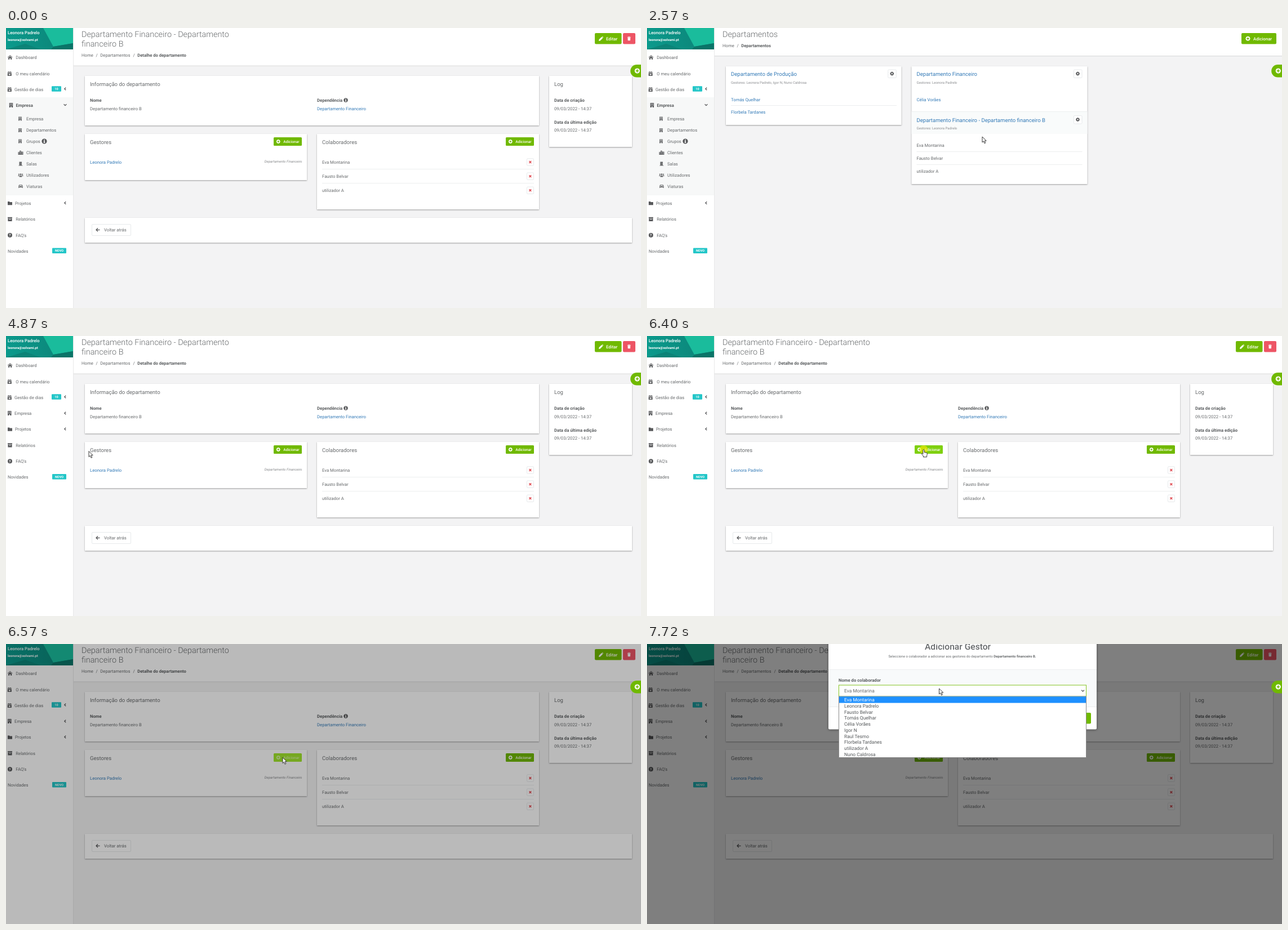
An HTML page that plays this animation: 1127x497 px, repeating every 8000 ms.

```html
<!DOCTYPE html>
<html lang="pt">
<head>
<meta charset="utf-8">
<title>Departamentos</title>
<style>
html, body { margin: 0; width: 100%; height: 100%; overflow: hidden; background: #f3f3f4 }
svg { display: block; width: 100vw; height: 100vh }
text { font-family: Roboto, sans-serif; text-rendering: geometricPrecision; white-space: pre }
.loading text { font-family: "Liberation Sans", Arial, sans-serif }
.loading .ico { display: none }
.card { fill: #fff; filter: drop-shadow(0 1px 1px rgba(0,0,0,.36)) }
</style>
</head>
<body>
<svg id="stage" viewBox="0 0 1127 497"></svg>
<script>
const GREY = '#676a6c', LINK = '#337ab7', GREEN = '#70b900', RED = '#ed5565', TEAL = '#23c6c8', LINE = '#e7eaec';
const BODY = 7.73, HEAD = 9.55, SMALL = 6.12;
const user = 'Leonora Padrelo';
const team = ['Eva Montarina', 'Fausto Belvar', 'utilizador A'];
const options = [team[0], user, team[1], 'Tomás Quelhar', 'Célia Vorães', 'Igor N', 'Raul Tesmo',
  'Florbela Tardanes', team[2], 'Nuno Caldrosa'];

// Drawing helpers; text is placed by the middle of its capitals.
const text = (x, y, s, size = BODY, fill = GREY, weight = 400, more = '') =>
  `<text x="${x}" y="${y + size * .355}" font-size="${size}" fill="${fill}" font-weight="${weight}" ${more}>${s}</text>`;
const bold = (x, y, s, size = BODY, fill = '#5b5e60') => text(x, y, s, size, fill, 700);
const rect = (x, y, x2, y2, fill, more = '') =>
  `<rect x="${x}" y="${y}" width="${x2 - x}" height="${y2 - y}" fill="${fill}" ${more}/>`;
const card = (x, y, x2, y2) => rect(x, y, x2, y2, '#fff', 'class="card"');
const box = (x, y, x2, y2, stroke = LINE) => rect(x, y, x2, y2, '#fff', `rx="1.5" stroke="${stroke}"`);
const rule = (x, y, x2) => rect(x, y, x2, y + 1, '#eceeef');
const group = (id, body, more = '') => `<g id="${id}" ${more}>${body}</g>`;

const icons = {
  home: 'M-4.5 0L0-4L4.5 0L4 .6L0-3L-4 .6ZM-3 .5L0-2.1L3 .5V4H1V1.5H-1V4H-3Z',
  calendar: 'M-3.5-3H-2V-4H-1V-3H1V-4H2V-3H3.5V-1.7H-3.5ZM-3.5-1.1H3.5V4H-3.5ZM-1.5 .5V2.4H1.5V.5Z',
  building: 'M-3.2-4H3.2V4H.8V2H-.8V4H-3.2ZM-2-3h1.3v1.2h-1.3ZM.7-3h1.3v1.2h-1.3ZM-2-.8h1.3v1.2h-1.3ZM.7-.8h1.3v1.2h-1.3Z',
  city: 'M-5-1.5H-2.2V-4H1V-2H5V4H-5ZM-4 0v1h1v-1ZM-1-2.5v1h1v-1ZM-1 .3v1h1v-1ZM2.5-.5v1h1v-1ZM2.5 1.5v1h1v-1Z',
  door: 'M-2.8-4H2.3V3H4V4H-4V3H-2.8ZM.6-.5v1h.8v-1Z',
  users: 'M0-3.5a1.7 1.7 0 1 0 .01 0ZM-3.5-3a1.2 1.2 0 1 0 .01 0ZM3.5-3a1.2 1.2 0 1 0 .01 0ZM-2.6 3.5V2Q-2.4 .6 0 .6T2.6 2V3.5ZM-5 1.8V.6Q-4.4-.4-2.2 .1L-3.2 1.8ZM5 1.8V.6Q4.4-.4 2.2 .1L3.2 1.8Z',
  car: 'M-4.2-.4L-3-3H3L4.2-.4V3.3H2.8V2.2H-2.8V3.3H-4.2ZM-2.8-.6H2.8L2.1-2H-2.1ZM-3.2 .3v.9h1.3v-.9ZM1.9 .3v.9h1.3v-.9Z',
  folder: 'M-4-3H-1L0-2H4V3.2H-4Z',
  archive: 'M-4-3.6H4V-1.6H-4ZM-3.6-1.1H3.6V3.6H-3.6ZM-1.3-.3V.6H1.3V-.3Z',
  trash: 'M-3.2-3.2H-1L-.5-4H.5L1-3.2H3.2V-2.2H-3.2ZM-2.7-1.7H2.7L2.3 4H-2.3Z',
  pencil: 'M-4 4L-3.4 1.3L1.2-3.3L3.3-1.2L-1.3 3.4ZM1.8-3.8L2.6-4.3L4.3-2.6L3.8-1.8Z',
  gear: 'M-.7-3.6H.7L1-2.5L2.2-3L3-2.2L2.5-1L3.6-.7V.7L2.5 1L3 2.2L2.2 3L1 2.5L.7 3.6H-.7L-1 2.5L-2.2 3L-3 2.2L-2.5 1L-3.6 .7V-.7L-2.5-1L-3-2.2L-2.2-3L-1-2.5ZM0-1.3a1.3 1.3 0 1 0 .01 0Z',
  plus: 'M0-4a4 4 0 1 0 .01 0ZM-.7-2.3H.7V-.7H2.3V.7H.7V2.3H-.7V.7H-2.3V-.7H-.7Z',
  info: 'M0-4a4 4 0 1 0 .01 0ZM-.7-2.6H.7V-1.4H-.7ZM-1-.8H.7V1.6H1.2V2.5H-1.2V1.6H-.7V0H-1Z'
};
const icon = (name, x, y, fill = '#58595b', scale = 1) =>
  `<path class="ico" d="${icons[name]}" fill="${fill}" fill-rule="evenodd" transform="translate(${x} ${y}) scale(${scale})"/>`;
const stroke = (x, y, d, color = '#58595b', width = 1.3) =>
  `<path class="ico" d="${d}" transform="translate(${x} ${y})" fill="none" stroke="${color}" stroke-width="${width}"/>`;
const chevLeft = y => stroke(105, y, 'M1.2-2.3L-1.2 0L1.2 2.3');
const chevDown = (x, y) => stroke(x, y, 'M-2.4-1.2L0 1.2L2.4-1.2');
const badge = (x, y, x2, s) => rect(x, y - 5, x2, y + 4.5, TEAL, 'rx="1"') +
  text((x + x2) / 2, y - .2, s, 5.6, '#fff', 700, 'text-anchor="middle"');
const addSmall = (x, id) => rect(x, 194, x + 50, 209, GREEN, `rx="1.5" id="${id}"`) +
  group(id + 'Label', icon('plus', x + 8.3, 201.5, '#fff', .85) + text(x + 17.3, 201.7, 'Adicionar', 6.6, '#fff', 500));

const profile = rect(0, 0, 119, 38, 'url(#teal)') +
  '<path d="M66 0H119V27L84 33Z" fill="#1abc9c"/><path d="M84 33L119 27V38H80Z" fill="#0a7468"/><path d="M0 38L34 28L62 38Z" fill="#0b8377"/>' +
  text(3, 8, user, BODY, '#fff', 500) + bold(3, 20.5, 'leonora@xolvami.pt', 6, '#fff');

const lowerMenu = y => icon('folder', 7, y) + text(16, y, 'Projetos') + chevLeft(y - .5) +
  icon('archive', 7, y + 28.3) + text(17.3, y + 28.3, 'Relatórios') +
  '<circle class="ico" cx="7" cy="' + (y + 56.8) + '" r="4" fill="#58595b"/>' + bold(5.2, y + 56.8, '?', 6.4, '#fff') +
  text(17.3, y + 56.8, 'FAQ\'s') + text(3, y + 85, 'Novidades') + badge(82, y + 84.5, 107, 'NOVO');

const subItems = [['building', 'Empresa', 161], ['building', 'Departamentos', 181.5], ['building', 'Grupos', 201],
  ['city', 'Clientes', 221.3], ['door', 'Salas', 241], ['users', 'Utilizadores', 261.3], ['car', 'Viaturas', 281]];

const sidebar = rect(0, 0, 119, 497, '#fff') + rect(119, 0, 120, 497, '#e8e8e9') + profile +
  icon('home', 7.2, 52) + text(17.3, 52, 'Dashboard') +
  icon('calendar', 6.3, 81) + text(17.3, 81, 'O meu calendário') +
  icon('calendar', 6.3, 109) + text(15, 109, 'Gestão de dias') + badge(81, 108.3, 98, '10') + chevLeft(108) +
  group('menuOpen', rect(0, 123, 119, 297, '#f7f8f8') + rect(0, 171, 119, 191, '#eef0f1', 'id="rowHover"') +
    icon('building', 9, 137) + bold(17.5, 137.5, 'Empresa') + chevDown(105, 136.5) +
    subItems.map(([i, s, y]) => icon(i, i == 'building' ? 25 : 26, y, '#6a6b6d', .9) + text(36, y, s)).join('') +
    icon('info', 68, 201, '#58595b', 1.15) + lowerMenu(311)) +
  group('menuClosed', icon('building', 6.3, 137) + text(15, 137.5, 'Empresa') + chevLeft(137) + lowerMenu(165.5));

const header = h => rect(120, 0, 1127, h, '#fff') + rect(120, h, 1127, h + 1, '#dfe0e1') + rect(120, h + 1, 1127, h + 2, '#ebebec');
const title = (y, s) => text(134, y, s, 14.4, GREY, 300);

const detailHead = header(66.5) + title(11, 'Departamento Financeiro - Departamento') + title(28, 'financeiro B') +
  text(134, 48.5, 'Home') + text(159.5, 48.5, '/') + text(167.3, 48.5, 'Departamentos') + text(225.5, 48.5, '/') +
  bold(233.3, 48.5, 'Detalhe do departamento', 7.6) +
  rect(1045, 9, 1092.5, 28.5, GREEN, 'rx="2"') + icon('pencil', 1056, 19, '#fff') + text(1065, 19, 'Editar', BODY, '#fff', 500) +
  rect(1095, 9, 1117, 28.5, RED, 'rx="2"') + icon('trash', 1105.8, 18.7, '#fff', .9);

const detail = card(140, 85, 946, 173) + text(149, 99.3, 'Informação do departamento', HEAD) +
  bold(149, 128.5, 'Nome') + text(149, 143, 'Departamento financeiro B') +
  bold(552, 128.5, 'Dependência') + icon('info', 603, 128, '#58595b', .95) + text(552, 143, 'Departamento Financeiro', BODY, LINK) +
  card(964, 85, 1111, 211) + text(973, 99.3, 'Log', HEAD) +
  bold(973, 128.5, 'Data de criação') + text(973, 143, '09/03/2022 - 14:37') +
  bold(973, 167, 'Data da última edição') + text(973, 181.3, '09/03/2022 - 14:37') +
  card(140, 188, 534, 270) + text(149, 202.3, 'Gestores', HEAD) + addSmall(475, 'addManager') +
  text(149, 238, user, BODY, LINK) + text(525.5, 237, 'Departamento Financeiro', SMALL, '#85878a', 400, 'font-style="italic" text-anchor="end"') +
  card(552, 188, 946, 322) + text(561, 202.3, 'Colaboradores', HEAD) + addSmall(887, 'addMember') +
  team.map((s, i) => {
    const y = 238 + i * 25.1;
    return text(561, y, s) + box(924.5, y - 6.2, 936.5, y + 6.2) + stroke(930.4, y, 'M-1.9-1.9L1.9 1.9M1.9-1.9L-1.9 1.9', '#df4a52', 1.4);
  }).join('') + rule(561, 250, 937) + rule(561, 275, 937) +
  card(140, 337, 1111, 381) + box(152.5, 348.5, 221.5, 368.5) +
  stroke(163, 358.3, 'M3.5 0H-3M0-3L-3 0L0 3') + text(174, 358.5, 'Voltar atrás');

const listHead = header(49) + title(11, 'Departamentos') + text(134, 31.3, 'Home') + text(159.5, 31.3, '/') + bold(167.3, 31.3, 'Departamentos', 7.6) +
  rect(1055, 9, 1117, 28.5, GREEN, 'rx="2"') + icon('plus', 1066.5, 18.7, '#fff') + text(1076, 19, 'Adicionar', BODY, '#fff', 500);

const gear = (x, y) => box(x - 7, y - 7, x + 7.5, y + 7.5) + icon('gear', x, y, '#58595b', .95);
const dept = (x, y, name, managers, id) => text(x, y, name, HEAD, LINK, 400, `id="${id}"`) +
  text(x, y + 14.7, 'Gestores: ' + managers, SMALL, '#8b8d90');
const list = card(140, 68, 451.5, 172) +
  dept(149, 82, 'Departamento de Produção', user + ', Igor N, Nuno Caldrosa', 'deptA') + gear(434.8, 81) +
  text(149, 127, 'Tomás Quelhar', BODY, LINK) + rule(149, 137, 443) + text(149, 149.5, 'Florbela Tardanes', BODY, LINK) +
  card(469.5, 68, 781.5, 277) + dept(478.5, 82, 'Departamento Financeiro', user, 'deptB') + gear(764.5, 81) +
  text(478.5, 127, 'Célia Vorães', BODY, LINK) +
  rect(469.5, 148, 781.5, 188, '#f9fbfb') + rule(469.5, 148, 781.5) +
  dept(478.5, 163.5, 'Departamento Financeiro - Departamento financeiro B', user, 'deptC') + gear(764.5, 162.5) +
  team.map((s, i) => text(478.5, 208.5 + i * 23, s)).join('') + rule(478.5, 219, 772.5) + rule(478.5, 242, 772.5);

const fab = '<path d="M1127 65H1119.5a11.3 11.3 0 0 0 0 22.6H1127Z" fill="#70b900"/>' + icon('plus', 1120.3, 76, '#fff', 1.15);

const modal = rect(322, -80, 798, 151.5, '#fff', 'rx="2" style="filter:drop-shadow(0 1px 2px rgba(0,0,0,.4))"') +
  rect(322, 45, 798, 111.5, '#f8fafb') + rule(322, 45, 798) + rule(322, 111, 798) +
  text(551.5, 4.5, 'Adicionar Gestor', 15.6, GREY, 500, 'text-anchor="middle"') +
  text(559.5, 22.2, 'Seleccione o colaborador a adicionar aos gestores do departamento <tspan font-weight="700">Departamento financeiro B.</tspan>',
    SMALL, GREY, 400, 'text-anchor="middle"') +
  bold(340, 64.3, 'Nome do colaborador') +
  rect(340.5, 73, 779.5, 93, '#fff', 'id="select" stroke="#dfe2e4"') +
  text(350, 83.5, team[0], 8.45) + chevDown(773.5, 83) +
  box(691, 122, 729, 141) + text(710, 131.7, 'Fechar', BODY, GREY, 400, 'text-anchor="middle"') +
  rect(734, 122, 788, 141.5, GREEN, 'rx="2"') + stroke(746.3, 131.3, 'M-3.6 .2L-1.1 2.6L3.6-2.4', '#fff', 1.8) +
  text(757.3, 131.7, 'Gravar', BODY, '#fff', 500);

const dropdown = rect(340.5, 93, 779.5, 201.5, '#fff', 'stroke="#8b8b8b"') + rect(341, 93.3, 779, 104.6, '#1e90ff') +
  options.map((s, i) => text(350, 99.2 + i * 10.72, s, 8.45, i ? '#55585a' : '#fff')).join('');

const cursor = group('arrow', '<path d="M0 0V10L2.3 7.9L4 11.8L5.8 11L4.1 7.2H7.2Z" fill="#fff" stroke="#222" stroke-width=".9"/>') +
  group('hand', '<path d="M-1.2 1Q0-.9 1.2 1V5L4.8 5.6Q6.6 6 6.4 8L5.6 11V13.3H-.6V11.5L-3.6 8Q-4 6.2-2.4 6.8L-1.2 8Z" fill="#fff" stroke="#222" stroke-width=".9"/>');

const stage = document.getElementById('stage');
stage.innerHTML = '<defs><linearGradient id="teal"><stop stop-color="#0b9a8c"/><stop offset="1" stop-color="#0c8175"/></linearGradient></defs>' +
  rect(0, 0, 1127, 497, '#f3f3f4') + group('detailHead', detailHead) + group('listHead', listHead) +
  group('detail', detail) + group('list', list) + sidebar +
  rect(0, 0, 1127, 497, '#000', 'id="shade"') + fab + group('modal', modal) + group('dropdown', dropdown) +
  '<circle id="click" r="7.3" fill="#f2ea00" opacity=".65"/>' + group('cursor', cursor);

const $ = id => document.getElementById(id);
const show = (id, on) => $(id).style.display = on ? '' : 'none';
const clamp = v => Math.min(1, Math.max(0, v));
const within = (t, ...spans) => spans.some(([a, b]) => t >= a && t < b);

// Pointer stops: time, x, y
const path = [[50, 943, 456], [790, 57, 183], [2230, 57, 183], [2490, 600, 203], [2570, 595, 193], [2980, 546.5, 165.5],
  [4380, 546.5, 165.5], [4860, 147, 204.5], [4930, 147, 204.5], [5190, 149.5, 196], [5240, 149.5, 196],
  [6000, 458, 195.5], [6050, 458, 195.5], [6240, 491, 201.5], [6930, 491, 201.5], [7430, 518.5, 79]];

function pointer(t) {
  const i = path.findIndex(k => k[0] > t);
  if (i < 0) return path[path.length - 1].slice(1);
  if (!i) return path[0].slice(1);
  const [t0, x0, y0] = path[i - 1], [t1, x1, y1] = path[i];
  const p = (t - t0) / (t1 - t0), e = p * p * (3 - 2 * p);
  return [x0 + (x1 - x0) * e, y0 + (y1 - y0) * e];
}

function draw(t) {
  const onList = within(t, [1510, 3840]);
  const blank = within(t, [1510, 1590], [3840, 3930]);
  stage.classList.toggle('loading', within(t, [1510, 1970], [3840, 4240]));
  show('listHead', onList);
  show('detailHead', !onList);
  show('list', onList && !blank);
  show('detail', !onList && !blank);
  show('menuOpen', t < 3840);
  show('menuClosed', t >= 3840);
  show('rowHover', within(t, [700, 2270]));
  $('deptC').setAttribute('fill', within(t, [2900, 3840]) ? '#23527c' : LINK);

  const pressed = within(t, [6480, 6940]);
  $('addManager').setAttribute('fill', pressed ? '#a2e62c' : within(t, [6150, 6480]) ? '#7fd00f' : GREEN);
  $('addManagerLabel').setAttribute('opacity', pressed ? .6 : 1);

  $('shade').setAttribute('opacity', .5 * clamp((t - 6490) / 150));
  const p = clamp((t - 6650) / 300);
  show('modal', p > 0);
  $('modal').setAttribute('opacity', clamp((t - 6650) / 150));
  $('modal').setAttribute('transform', `translate(0 ${-60 * (1 - p) ** 2})`);
  $('select').setAttribute('stroke', t >= 7560 ? '#83c41f' : '#dfe2e4');
  show('dropdown', t >= 7640);

  const at = `translate(${pointer(t).join(' ')})`;
  const hand = within(t, [740, 1510], [3050, 3840], [6150, 6500]);
  show('cursor', t >= 70);
  show('hand', hand);
  show('arrow', !hand);
  $('cursor').setAttribute('transform', at);
  $('click').setAttribute('transform', at);
  show('click', within(t, [940, 1020], [3230, 3380], [6330, 6480], [7500, 7580]));
}

const start = performance.now();
function tick() {
  draw((performance.now() - start) % 8000);
  requestAnimationFrame(tick);
}
tick();
</script>
</body>
</html>
```
